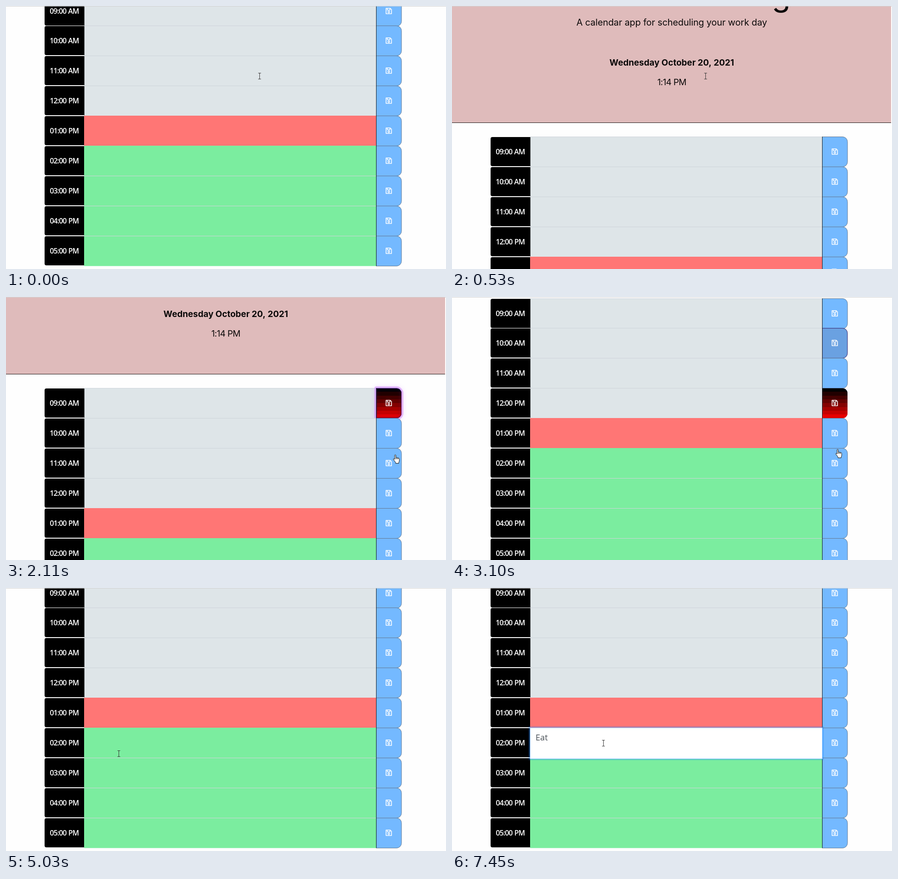
Animation of 969 by 578 pixels, one loop 8000 ms. Source, as an HTML page with a canvas:

```html
<!DOCTYPE html>
<html lang="en">
<head>
<meta charset="utf-8">
<title>Day planner</title>
<style>
html, body { margin: 0; width: 100%; height: 100%; overflow: hidden; background: #fefefe; }
canvas { display: block; }
</style>
</head>
<body>
<canvas id="stage" width="969" height="578"></canvas>
<script>
const ctx = document.getElementById('stage').getContext('2d');
const LOOP = 8000, STEP = 139.7;
const PITCH = 65.9, LEFT = 85, AREA = 172, BTN = 815, RIGHT = 871;
const HEAD_FONT = 'Inter, "Open Sans", sans-serif';
const BODY_FONT = '"Open Sans", "Noto Sans", sans-serif';
const PAST = '#dee5e8', NOW = '#ff7675', FUTURE = '#7bed9f', BLUE = '#74b9ff';
const CURRENT = 4, EDITED = 5;

// Wheel moves: start, duration, distance
const FIRST_TOP = -22.5;
const WHEEL = [[0, 695, 381.5], [1830, 260, -158.7], [2800, 270, -197.8], [3500, 140, -25]];

// Pointer stops: time, x, y
const POINTER = [[0, 558, 154], [1130, 558, 154], [1397, 779, 384], [1560, 846, 392],
  [2095, 860, 355], [3073, 852, 343], [3600, 850, 343], [4480, 845, 472],
  [4890, 202, 350], [5029, 248, 364], [5560, 333, 341]];

// Buttons visited: row, time of arrival; each is left when the next is reached
const VISITS = [[0, 1550], [1, 2230], [3, 2900], [5, 3620], [6, 3900], [7, 4320], [-1, 4600]];

const STROKES = ['E', 'at', ' '], TYPE_START = 6430, TYPE_GAP = 290;
const FOCUS = 5270, CARET_START = 5410, BLINK = 438;

const clamp = v => Math.max(0, Math.min(1, v));
const easeOut = p => Math.sin(clamp(p) * Math.PI / 2);

function scrollTop(t) {
  return WHEEL.reduce((y, [from, time, dist]) => y + dist * easeOut((t - from) / time), FIRST_TOP);
}

function pointerAt(t) {
  const i = POINTER.findIndex(k => k[0] > t);
  const b = POINTER.at(i), a = i < 0 ? b : POINTER[i - 1];
  const p = i < 0 ? 0 : (t - a[0]) / (b[0] - a[0]);
  return [1, 2].map(c => Math.round(a[c] + (b[c] - a[c]) * p));
}

function rect(x, y, w, h, color) {
  ctx.fillStyle = color;
  ctx.fillRect(x, y, w, h);
}

function text(str, x, y, font, color, align = 'center', spacing = 0) {
  ctx.font = font;
  ctx.fillStyle = color;
  ctx.textAlign = align;
  ctx.letterSpacing = spacing + 'px';
  ctx.fillText(str, x, y);
}

function header(top) {
  const line = Math.round(top - 31);
  if (line < 0) return;
  rect(0, 0, 967, line, '#dfbbbb');
  rect(0, line, 967, 1, '#1c1414');
  const ink = '#0b0909';
  const centered = (str, dy, style, spacing) =>
    text(str, 484, Math.round(top) + dy, style + ' ' + HEAD_FONT, ink, 'center', spacing);
  centered('Desk Hour Arranger', -287, '400 68px', 1);
  centered('A calendar app for scheduling your work day', -244, '400 20px', -0.1);
  centered('Wednesday October 20, 2021', -156, '700 19px');
  centered('1:14 PM', -113, '400 19px', -0.6);
}

function saveIcon(cx, cy) {
  ctx.save();
  ctx.translate(cx, cy);
  ctx.strokeStyle = '#fff';
  ctx.lineWidth = 1.6;
  ctx.lineJoin = 'round';
  ctx.stroke(new Path2D('M-6-6H3.2L6-3.2V6H-6ZM-3.3-6V-2H2.6V-6'));
  ctx.beginPath();
  ctx.arc(0, 2, 1.8, 0, 7);
  ctx.stroke();
  ctx.restore();
}

// The gradient switches at once, the glow follows slowly.
function hoverState(row, t) {
  const i = VISITS.findIndex(v => v[0] === row);
  if (i < 0 || t < VISITS[i][1]) return { on: false, glow: 0 };
  const enter = VISITS[i][1], leave = VISITS[i + 1][1];
  if (t < leave) return { on: true, glow: clamp((t - enter) / 500) ** 3 };
  return { on: false, glow: clamp(1 - (t - leave) / 210) };
}

function button(row, y, t) {
  const { on, glow } = hoverState(row, t);
  const w = RIGHT - BTN, h = PITCH + 0.6;
  const shape = new Path2D();
  shape.roundRect(BTN + 0.5, y + 0.5, w - 0.5, h - 0.5, [0, 11, 11, 0]);

  if (on && glow > 0) {
    ctx.save();
    ctx.shadowColor = ctx.strokeStyle = `rgba(200, 110, 255, ${glow * 0.45})`;
    ctx.shadowBlur = 10;
    ctx.lineWidth = 8;
    ctx.lineJoin = 'round';
    ctx.stroke(shape);
    ctx.restore();
  }

  ctx.save();
  ctx.clip(shape);
  rect(BTN, y, w + 1, h + 1, BLUE);
  if (on) {
    const bands = 8;
    for (let i = 0; i < bands; i++) {
      rect(BTN, Math.round(y + i * h / bands), w + 1, h / bands + 1, `rgb(${i * 33}, 0, 0)`);
    }
  } else {
    rect(BTN, y, w + 1, h + 1, `rgba(60, 50, 80, ${glow})`);
  }
  if (glow > 0) {
    ctx.strokeStyle = `rgba(50, 0, 90, ${glow * 0.6})`;
    ctx.shadowColor = `rgba(50, 0, 90, ${glow * 0.7})`;
    ctx.shadowBlur = 8;
    ctx.lineWidth = 3;
    ctx.stroke(shape);
  }
  ctx.restore();

  ctx.strokeStyle = glow > 0 ? 'rgba(50, 20, 90, .8)' : '#64788f';
  ctx.lineWidth = 1;
  if (!on) ctx.stroke(shape);
  rect(BTN, y, 1, h, '#10181f');
  saveIcon(843, y + 33);
}

function row(i, y, t) {
  const past = i < CURRENT;
  rect(AREA, y, BTN - AREA, PITCH + 0.6, past ? PAST : i === CURRENT ? NOW : FUTURE);
  if (past || i > CURRENT + 1) rect(AREA, y, BTN - AREA, 1, '#ced4da');

  ctx.fillStyle = '#000';
  ctx.beginPath();
  ctx.roundRect(LEFT, y + 1, AREA - LEFT, 64, [4, 0, 0, 4]);
  ctx.fill();
  if (past) {
    rect(AREA, y + 1, 1, 64, '#000');
    for (let d = 1; d < 64; d += 2) rect(AREA, y + d, 1, 1, '#a8aeb0');
  }
  const hour = 9 + i;
  const label = String((hour - 1) % 12 + 1).padStart(2, '0') + ':00 ' + (hour < 12 ? 'AM' : 'PM');
  ctx.wordSpacing = '1px';
  text(label, 128.3, y + 39, '600 16px ' + BODY_FONT, '#fff', 'center', -0.9);
  ctx.wordSpacing = '0px';
  button(i, y, t);
}

function editor(y, t) {
  const shown = clamp((t - FOCUS) / 150);
  if (shown <= 0) return;
  const w = BTN - AREA;
  ctx.save();
  ctx.globalAlpha = shown;
  ctx.strokeStyle = 'rgba(0, 123, 255, .25)';
  ctx.lineWidth = 3.2;
  ctx.strokeRect(AREA - 2, y - 1.6, w + 4, 71.4);
  rect(AREA, y, w, 68.4, '#fff');
  ctx.strokeStyle = '#80bdff';
  ctx.lineWidth = 1;
  ctx.strokeRect(AREA - 0.1, y + 0.2, w + 0.6, 68.2);
  ctx.restore();

  const count = Math.max(0, Math.min(STROKES.length, Math.floor((t - TYPE_START) / TYPE_GAP) + 1));
  const typed = STROKES.slice(0, count).join('');
  text(typed, 184, y + 28, '400 18.4px ' + BODY_FONT, '#495057', 'left');

  const lastKey = count ? TYPE_START + (count - 1) * TYPE_GAP : CARET_START;
  const caretOn = Math.floor(Math.max(0, t - lastKey) / BLINK) % 2 === 0;
  if (caretOn) rect(184 + Math.floor(ctx.measureText(typed).width), y + 7, 1, 26, '#495057');
}

function beam(x, y) {
  ctx.strokeStyle = '#333';
  ctx.lineWidth = 1;
  ctx.save();
  ctx.translate(x + 0.5, y + 0.5);
  ctx.stroke(new Path2D('M-3-7H3M0-7V6M-3 6H3'));
  ctx.restore();
}

function hand(x, y) {
  ctx.save();
  ctx.translate(x - 7, y - 9);
  const p = new Path2D('M3 1.5Q4.3 0 5.6 1.5V7Q7 6 8 7.4Q9.6 6.6 10.4 8Q12.6 7.4 13.2 9.6V14'
    + 'Q13 16 12 17.2V19.5H5V17.5L1 12.2Q-.6 10 .8 9.4Q2 9.2 3 11Z');
  ctx.fillStyle = '#fff';
  ctx.fill(p);
  ctx.strokeStyle = '#111';
  ctx.lineWidth = 1;
  ctx.lineJoin = 'round';
  ctx.stroke(p);
  ctx.stroke(new Path2D('M5.6 7.4V10.5M8 7.4V10.5M10.4 7.4V10.5'));
  ctx.restore();
}

function draw(t) {
  // The page and pointer refresh in steps; typing keeps its own rhythm.
  const tick = Math.floor(t / STEP) * STEP;
  const top = scrollTop(tick);
  const rowY = i => Math.round(top + i * PITCH);
  rect(0, 0, 969, 578, '#fefefe');
  header(top);
  for (let i = 0; i < 9; i++) row(i, rowY(i), tick);
  editor(rowY(EDITED), t);
  const [x, y] = pointerAt(tick);
  (x > BTN ? hand : beam)(x, y);
  rect(0, 0, 969, 1, '#d2d2d2');
}

const start = performance.now();
function loop() {
  draw((performance.now() - start) % LOOP);
  requestAnimationFrame(loop);
}
loop();
</script>
</body>
</html>
```
